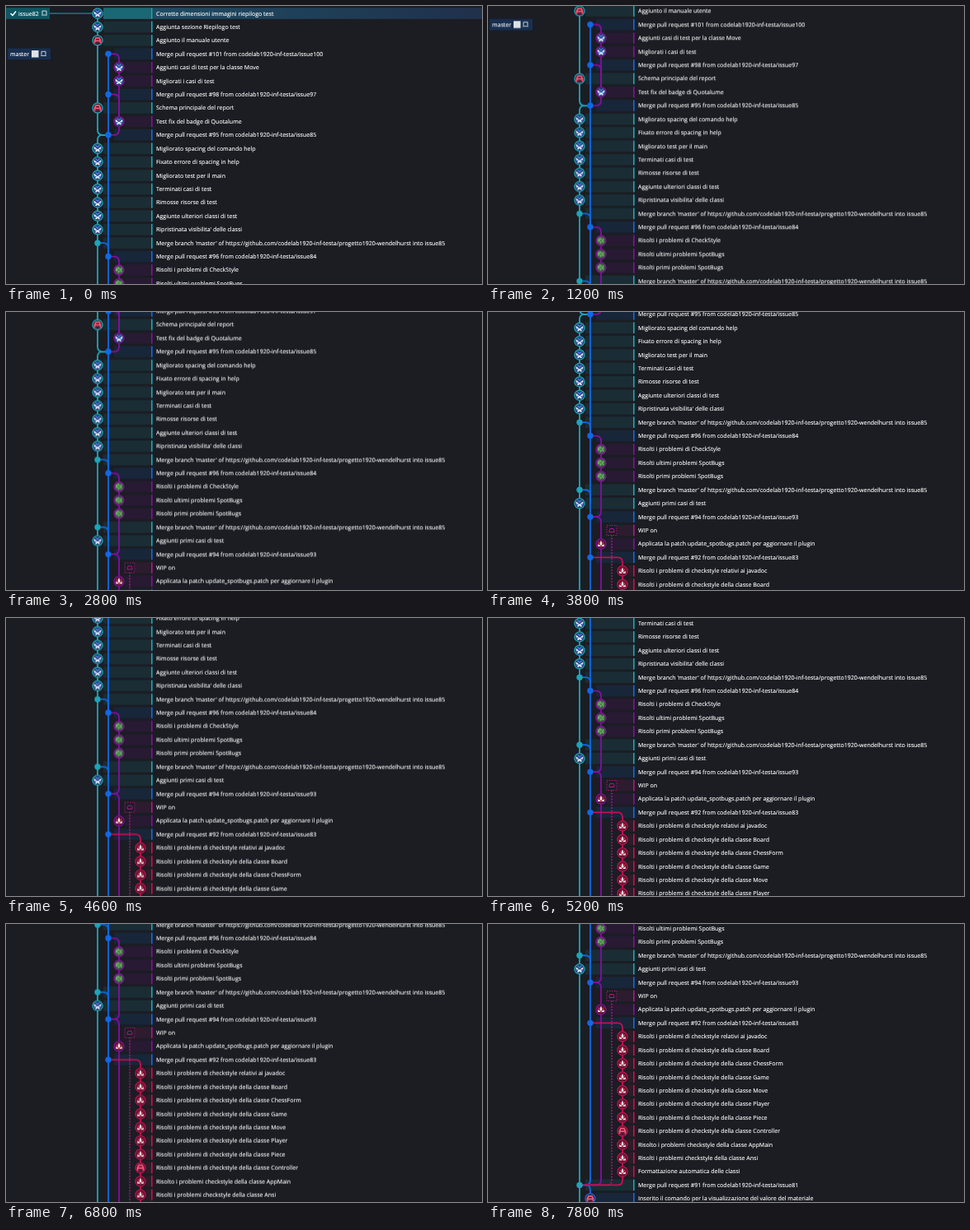
Animation, 577 px wide and 338 px high, one loop 8000 ms. Source, as an HTML page:

```html
<!DOCTYPE html>
<html lang="it">
<head>
<meta charset="utf-8">
<title>Commit graph</title>
<style>
  html, body { margin: 0; width: 100%; height: 100%; overflow: hidden; background: #1b1d23; }
  svg { display: block; width: 577px; height: 338px; }
  text { font: 7.04px "Open Sans", "Noto Sans", sans-serif; fill: #fff; stroke: #fff; stroke-width: .12px; text-rendering: geometricPrecision; }
  #log { animation: scroll 8s infinite; }
  /* Ramps up, then scrolls steadily, refreshed five times a second. */
  @keyframes scroll {
    0% { transform: translateY(0); animation-timing-function: step-end; }
    2.5% { transform: translateY(-1px); animation-timing-function: step-end; }
    5% { transform: translateY(-4.5px); animation-timing-function: step-end; }
    7.5% { transform: translateY(-10px); animation-timing-function: step-end; }
    10% { transform: translateY(-18px); animation-timing-function: steps(2); }
    15% { transform: translateY(-35.7px); animation-timing-function: steps(8); }
    35% { transform: translateY(-108.6px); animation-timing-function: steps(5); }
    47.5% { transform: translateY(-154px); animation-timing-function: steps(7); }
    65% { transform: translateY(-216px); animation-timing-function: steps(4); }
    75% { transform: translateY(-251.6px); animation-timing-function: steps(9); }
    97.5%, 100% { transform: translateY(-332px); }
  }
</style>
</head>
<body>
<svg viewBox="0 0 577 338">
  <linearGradient id="selected">
    <stop stop-color="#1f4c63"/>
    <stop offset="1" stop-color="#20304b"/>
  </linearGradient>
  <g id="log"></g>
</svg>
<script>
const colors = { t: '#1ba6b8', b: '#0f69e6', p: '#850fa0', m: '#b5148f', c: '#c80f50' };
const lanes = { t: 111, b: 124, p: 137, m: 150, c: 163 };
const rowY = row => 9 + row * 16.42;

const pull = (id, issue) => `Merge pull request #${id} from codelab1920-inf-testa/issue${issue}`;
const branch = "Merge branch 'master' of https://github.com/codelab1920-inf-testa/progetto1920-wendelhurst into issue85";
const fixed = name => 'Risolti i problemi di checkstyle della classe ' + name;

// Each row: lane letter, marker, message.
const rows = [
  ['t', 'fox', 'Corrette dimensioni immagini riepilogo test'],
  ['t', 'fox', 'Aggiunta sezione Riepilogo test'],
  ['t', 'arch', 'Aggiunto il manuale utente'],
  ['b', 'dot', pull(101, 100)],
  ['p', 'fox', 'Aggiunti casi di test per la classe Move'],
  ['p', 'fox', 'Migliorati i casi di test'],
  ['b', 'dot', pull(98, 97)],
  ['t', 'arch', 'Schema principale del report'],
  ['p', 'fox', 'Test fix del badge di Quotalume'],
  ['b', 'dot', pull(95, 85)],
  ['t', 'fox', 'Migliorato spacing del comando help'],
  ['t', 'fox', 'Fixato errore di spacing in help'],
  ['t', 'fox', 'Migliorato test per il main'],
  ['t', 'fox', 'Terminati casi di test'],
  ['t', 'fox', 'Rimosse risorse di test'],
  ['t', 'fox', 'Aggiunte ulteriori classi di test'],
  ['t', 'fox', "Ripristinata visibilita' delle classi"],
  ['t', 'dot', branch],
  ['b', 'dot', pull(96, 84)],
  ['p', 'leaf', 'Risolti i problemi di CheckStyle'],
  ['p', 'leaf', 'Risolti ultimi problemi SpotBugs'],
  ['p', 'leaf', 'Risolti primi problemi SpotBugs'],
  ['t', 'dot', branch],
  ['t', 'fox', 'Aggiunti primi casi di test'],
  ['b', 'dot', pull(94, 93)],
  ['m', 'stash', 'WIP on'],
  ['p', 'tower', 'Applicata la patch update_spotbugs.patch per aggiornare il plugin'],
  ['b', 'dot', pull(92, 83)],
  ['c', 'tower', 'Risolti i problemi di checkstyle relativi ai javadoc'],
  ...['Board', 'ChessForm', 'Game', 'Move', 'Player', 'Piece'].map(name => ['c', 'tower', fixed(name)]),
  ['c', 'arch', fixed('Controller')],
  ['c', 'tower', 'Risolto i problemi checkstyle della classe AppMain'],
  ['c', 'tower', 'Risolti i problemi checkstyle della classe Ansi'],
  ['c', 'tower', 'Formattazione automatica delle classi'],
  ['t', 'dot', pull(91, 81)],
  ['b', 'arch', 'Inserito il comando per la visualizzazione del valore del materiale'],
];

const avatars = {
  fox: `<circle r="5.2" fill="#27406f"/>
    <path d="M-4.3-2.5L0 1 4.3-2.5V0L2 2 3 4H1L0 2.5-1 4H-3L-2 2-4.3 0Z" fill="#e4edfa"/>
    <path d="M-2.5-4L0-1.5 2.5-4M-4 2L-1.5 .8M4 2L1.5 .8" fill="none" stroke="#4b7ff0" stroke-width="1.3"/>`,
  arch: `<circle r="5.2" fill="#561c33"/>
    <path d="M-3.5 3.5V0L-2-3H2L3.5 0V3.5M-3 .5H3" fill="none" stroke="#f05a78" stroke-width="1.7"/>`,
  leaf: `<circle r="5.2" fill="#4a5550"/>
    <path d="M-4-2L-1-4 1-2 4-3 3 0 4 3 1 2-1 4-2 1-4 2Z" fill="#5fae58"/>
    <path d="M-2-2L2 2M2-2L-2 2" stroke="#59605e" stroke-width=".8"/>`,
  tower: `<circle r="5.2" fill="#5a1730"/>
    <path d="M-3.8 3V0L-1.4 2V-1L0-4.3 1.4-1V2L3.8 0V3H1L0 1-1 3Z" fill="#f3e6ea"/>
    <path d="M-3-2.5L-1.8 0M3-2.5L1.8 0M0 1V4" stroke="#d8344f" stroke-width="1.1"/>`,
};

const line = (color, d, extra = '') =>
  `<path d="${d}" fill="none" stroke="${colors[color]}" stroke-width="1.8" ${extra}/>`;
const vertical = (lane, from, to) => line(lane, `M${lanes[lane]} ${rowY(from)}V${rowY(to)}`);

// Rounded elbow between a row's node and another lane; dir 1 leads down, -1 leads up.
function elbow(color, row, from, to, dir, nextRow, extra) {
  const y = rowY(row), x = lanes[to], side = Math.sign(x - lanes[from]);
  return line(color, `M${lanes[from]} ${y}H${x - side * 6}Q${x} ${y} ${x} ${y + dir * 6}V${rowY(nextRow)}`, extra);
}

function marker(lane, kind, y) {
  const x = lanes[lane], color = colors[lane];
  if (kind === 'dot') return `<circle cx="${x}" cy="${y}" r="3.7" fill="${color}"/>`;
  const at = `<g transform="translate(${x} ${y})">`;
  if (kind === 'stash') return `${at}<rect x="-6" y="-6" width="12" height="12" fill="#1b1d23"
    stroke="${color}" stroke-dasharray="1.5 1.5"/><path d="M-3 2V0L-2-2H2L3 0V2Z" fill="none" stroke="${color}"/></g>`;
  return `${at}<circle r="6" fill="#1d2029" stroke="${color}" stroke-width="1.4"/>${avatars[kind]}</g>`;
}

const band = ([lane], i) => {
  const x = lanes[lane] + 7, y = rowY(i) - 6.8, fill = colors[lane];
  return `<rect x="${x}" y="${y}" width="${176 - x}" height="13.6" fill="${fill}" opacity="${i ? .12 : .55}"/>
    <rect x="176" y="${y}" width="1.6" height="13.6" fill="${fill}"/>`;
};
const message = ([, , text], i) => `<text x="182" y="${rowY(i) + 2.5}">${text}</text>`;
const laptop = (x, y) => `<path d="M${x + 1} ${y + 1}V${y - 3}H${x + 6}V${y + 1}M${x} ${y + 2}H${x + 7}"
  fill="none" stroke="#e6e8ea" stroke-width=".9"/>`;

const labels = `
  <rect x="178" y="2.2" width="399" height="13.6" fill="url(#selected)"/>
  <path d="M53 9H105" stroke="${colors.t}"/>
  <rect y="2.2" width="53" height="13.6" fill="#0e5762"/>
  <path d="M5.5 9L8 11.5 12 6.5" fill="none" stroke="#fff" stroke-width="1.5"/>
  <text x="15" y="11.5">issue82</text>${laptop(43, 9)}
  <rect x="2" y="51.5" width="52" height="13.6" fill="#182f50"/>
  <text x="5" y="60.8">master</text>
  <rect x="31" y="54" width="8.5" height="8.5" fill="#dfe3e8"/>${laptop(42, 58.3)}`;

const graph = [
  vertical('t', 0, 8.6),
  elbow('t', 9, 'b', 't', -1, 8.5),
  elbow('t', 9, 'b', 't', 1, 10),
  vertical('t', 10, 42),
  vertical('b', 3, 38.5),
  elbow('b', 39, 't', 'b', -1, 38.4),
  elbow('b', 39, 't', 'b', 1, 42),
  elbow('b', 17, 't', 'b', 1, 18),
  elbow('b', 22, 't', 'b', 1, 23),
  elbow('p', 3, 'b', 'p', 1, 6),
  elbow('p', 6, 'b', 'p', 1, 8),
  elbow('p', 9, 'b', 'p', -1, 6),
  elbow('p', 18, 'b', 'p', 1, 21),
  elbow('p', 24, 'b', 'p', -1, 21),
  elbow('p', 24, 'b', 'p', 1, 26),
  elbow('p', 39, 't', 'p', -1, 26),
  elbow('m', 39, 't', 'm', -1, 25, 'stroke-dasharray="1.5 2"'),
  elbow('c', 27, 'b', 'c', 1, 28),
  elbow('c', 39, 't', 'c', -1, 28),
];

document.getElementById('log').innerHTML = [
  labels,
  ...rows.map(band),
  ...graph,
  ...rows.map(([lane, kind], i) => marker(lane, kind, rowY(i))),
  ...rows.map(message),
].join('');
</script>
</body>
</html>
```
